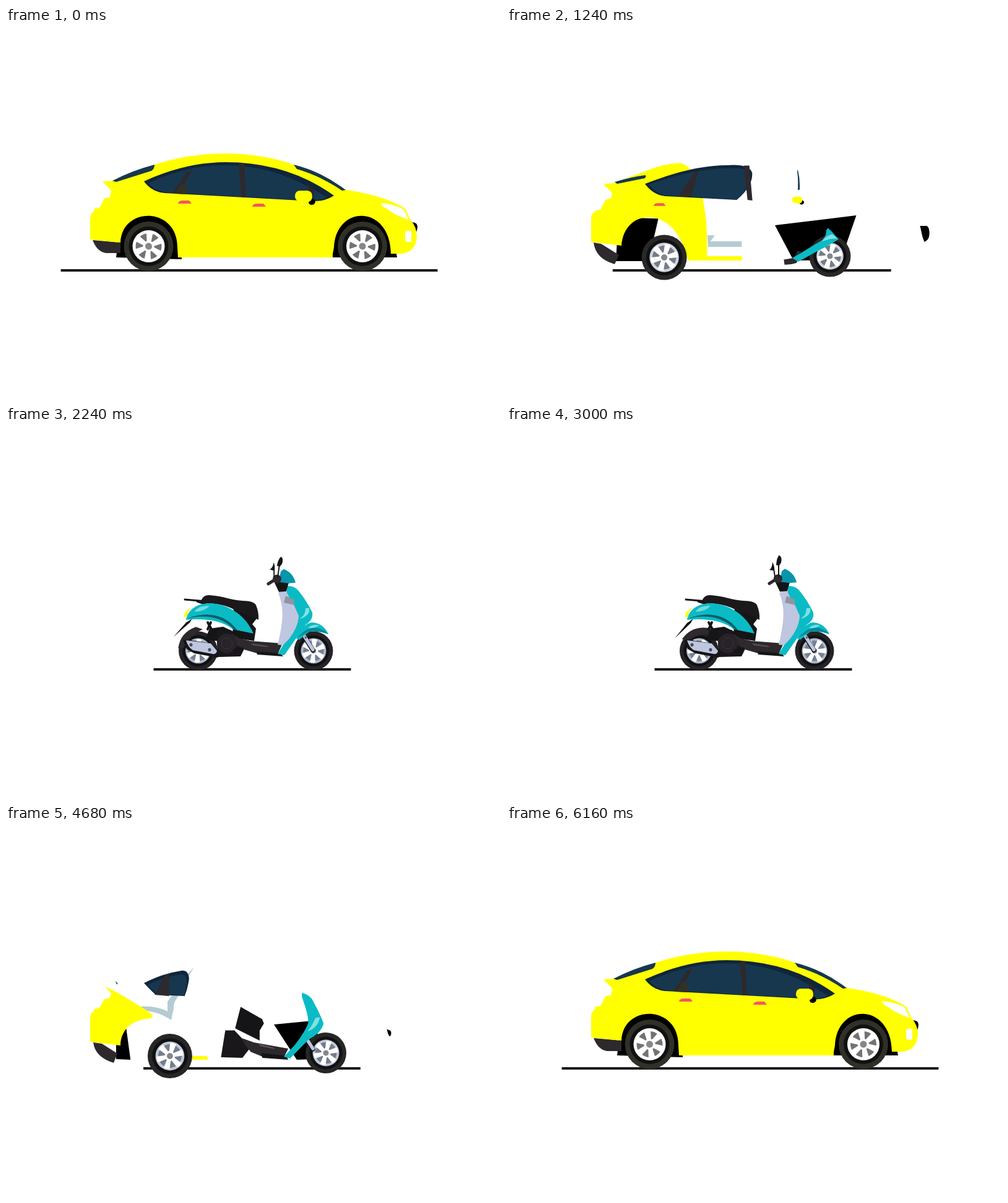
These frames come from a looping animation (800 px wide and 600 px high, 6200 ms). An HTML page:

```html
<!DOCTYPE html>
<html lang="en">
<head>
<meta charset="utf-8">
<title>Car and scooter</title>
<style>
html, body { margin: 0; width: 100%; height: 100%; overflow: hidden; background: #fff }
svg { display: block }
</style>
</head>
<body>
<svg id="stage" width="800" height="600" viewBox="0 0 800 600"></svg>
<script>
const LOOP = 6200, TURN = 6042;
const NUM = /-?\d+(\.\d+)?/g;
const stage = document.getElementById('stage');
const clamp = v => Math.max(0, Math.min(1, v));
const ease = u => u < .5 ? 4 * u ** 3 : 1 - 4 * (1 - u) ** 3;
const lerp = (a, b, u) => a + (b - a) * u;

function add(tag, attrs, parent) {
  const el = document.createElementNS('http://www.w3.org/2000/svg', tag);
  for (const k in attrs) el.setAttribute(k, attrs[k]);
  return parent.appendChild(el);
}

// Scale a path about x,y and shift it; by default it collapses to the point.
function move(d, x, y, s = 0, dx = 0, dy = 0) {
  let i = 0;
  return d.replace(NUM, n => i++ % 2 ? y + (n - y) * s + dy : x + (n - x) * s + dx);
}

function mixPath(a, b, u) {
  const to = b.match(NUM);
  let i = 0;
  return a.replace(NUM, n => lerp(+n, +to[i++], u).toFixed(2));
}

function at(keys, t, mix) {
  if (t <= keys[0][0]) return keys[0][1];
  for (let i = 1; i < keys.length; i++) {
    const [t0, a] = keys[i - 1], [t1, b] = keys[i];
    if (t < t1) return mix(a, b, (t - t0) / (t1 - t0));
  }
  return keys[keys.length - 1][1];
}

const parts = [], pops = [], wheels = [];
function part(parent, fill, ...keys) {
  parts.push([add('path', { fill }, parent), keys]);
}

// Group of fixed shapes that grows and swings out of a pivot between two times.
function pop(parent, x, y, from, to, spin, shapes, bob = 0) {
  const g = add('g', {}, parent);
  for (const [fill, d, width] of shapes)
    add('path', width ? { d, fill: 'none', stroke: fill, 'stroke-width': width, 'stroke-linecap': 'round' } : { d, fill }, g);
  pops.push({ g, x, y, from, to, spin, bob });
}

function wheel(parent, ...keys) {
  const g = add('g', {}, parent);
  const tyre = add('circle', { r: 40 }, g);
  add('circle', { r: 32, fill: '#111' }, g);
  const rim = add('circle', { r: 26 }, g);
  const hub = add('g', {}, g);
  const gaps = add('circle', { r: 21 }, hub);
  for (let a = 0; a < 360; a += 60)
    add('path', { d: 'M-3 -4 L-5.500 -23 Q0 -25 5.500 -23 L3 -4Z', fill: '#fff', transform: `rotate(${a})` }, hub);
  add('circle', { r: 9, fill: '#fff' }, hub);
  add('circle', { r: 5.5, fill: '#85878b' }, hub);
  wheels.push({ g, tyre, rim, hub, gaps, keys });
}

const ground = add('path', { stroke: '#191919', 'stroke-width': 4 }, stage);
const car = add('g', {}, stage);
const YELLOW = '#ff0', NAVY = '#17374f', DARK = '#2d292c', TEAL = '#0abbc5', BLACK = '#151517', SILVER = '#bfc6df';

// Inner frame, seen while the body opens
const bar = 'M324 335 L336 335 L329 345 L380 345 L380 354 L325 354Z';
part(car, '#b4cbd3', [1020, move(bar, 324, 354)], [1140, bar], [1240, bar], [1330, move(bar, 324, 354)]);
const frame = 'M292 241 L304 228 L294 245 L276 279 Q270 287 271 295 L267 314 Q242 297 215 299 L215 292 Q244 290 261 300 L261 284Z';
part(car, '#b4cbd3', [1250, move(frame, 250, 285)], [1330, frame], [1390, frame], [1480, move(frame, 240, 295)]);

// Underbody
const underRear = 'M178 330 L194 328 L201 378 L178 377Z';
part(car, '#000', [850, 'M186 298 L277 298 L284 374 L178 371Z'], [1240, 'M180 306 L245 308 L229 377 L176 377Z'],
  [1362, underRear], [1960, move(underRear, 190, 360)]);
const underFront = 'M433 321 L505 314 L500 377 L470 378Z';
part(car, '#000', [850, 'M530 300 L620 300 L632 371 L525 371Z'], [1240, 'M433 319 L565 303 L540 375 L463 376Z'],
  [1362, underFront], [1500, move(underFront, 472, 350)]);
const nose = 'M615 329 L619 330 Q622 331 622 335 Q622 340 619 340 L617 336Z';
part(car, '#000', [700, 'M656 314 L661 315 Q665 317 665 322 Q664 332 660 333 L657 330Z'],
  [802, 'M670 316 L683 315 Q688 318 688 325 Q688 342 679 343 L676 329Z'],
  [1240, 'M668 320 L679 320 Q684 323 683 335 Q682 343 675 346 L672 338Z'],
  [1362, nose], [1420, move(nose, 605, 335)]);
const bumper = 'M141 350 L155 352 L180 368 L174 383 Q144 374 141 350Z';
part(car, DARK, [850, 'M140 343 L185 347 L185 364 L162 364 Q147 362 140 343Z'],
  [1240, 'M140 347 L152 349 L181 367 L174 382 Q143 373 140 347Z'], [1362, bumper], [1940, move(bumper, 180, 368)]);

// Body shell
const shell = 'M160 260 L170 264 L190 276 C198 281 205 285 211 289 C218 293 226 298 230 301 C234 304 236 306 236 308 C236 310 234 310 233 311 L232 311 Q231 311 230 311 Q229 311 228 311 L227 311 C226 311 222 312 221 312 L219 313 L217 313 L215 314 C197 320 185 335 185 355 L136 349 L136 309 Q137 302 141 300 L143 296 L151 294 Q156 285 159 280 L168 278 L170 270Z';
part(car, YELLOW,
  [820, 'M156 248 L172 247 L240 221 C280 208 320 203 353 203 C395 203 435 210 465 221 C500 233 525 248 550 262 C585 267 620 276 645 292 L654 311 Q664 321 664 338 Q662 362 640 365 L622 365 C621 285 533 285 530 355 L527 371 L278 371 L277 355 C277 288 187 288 185 347 L136 342 L136 307 Q137 299 141 298 L143 292 L151 291 Q156 282 159 275 L168 274 L170 263Z'],
  [1240, 'M156 252 L172 251 L240 225 C250 222 270 217 280 218 C288 219 294 225 298 230 C304 240 312 260 317 275 C321 295 324 320 324 345 L324 369 Q324 370 324 372 Q324 376 322 376 L320 376 C318 376 312 376 310 376 L300 376 L294 376 L290 368 C272 288 190 288 185 352 L136 346 L136 307 Q137 299 141 298 L143 295 L151 294 Q156 285 159 278 L168 275 L170 267Z'],
  [1362, shell], [1900, move(shell, 150, 345)]);
const sill = 'M300 372 L324 372 L327 378 L301 378Z';
part(car, YELLOW, [850, 'M278 365 L528 365 L528 371 L278 371Z'], [1240, 'M292 369 L380 369 L380 376 L292 376Z'],
  [1362, sill], [1430, move(sill, 300, 375)]);

// Lamps
const lamp = 'M606 283 Q632 286 643 294 L651 310 Q630 304 615 292 Q606 288 606 283Z';
part(car, '#fff', [680, lamp], [805, move(lamp, 604, 279, .08)], [830, move(lamp, 604, 279)]);
const fog = 'M647 328 L655 328 L655 346 L649 346 Q645 346 645 340 L645 331Z';
part(car, '#fff', [680, fog], [780, move(fog, 655, 337)]);

// Windows: dark rim, glass, pillars
const glass = 'M223 254 Q255 238 283 234 Q294 233 295 247 Q293 263 288 275 L242 273 Q234 266 223 254Z';
part(car, '#10253c', [820, 'M223 248 Q290 217 355 217 Q455 217 530 271 Q515 281 495 280 L258 267 Q236 266 223 248Z'],
  [1240, 'M223 252 Q300 222 355 222 Q392 219 397 234 Q399 255 372 278 L256 272 Q236 270 223 252Z'],
  [1362, glass], [1480, move(glass, 225, 258)]);
part(car, NAVY, [820, 'M230 251 Q290 222 355 222 Q440 222 518 274 Q510 279 495 279 L260 266 Q240 263 230 251Z'],
  [1240, 'M230 253 Q300 228 355 227 Q388 224 394 237 Q395 255 372 277 L258 271 Q240 268 230 253Z'],
  [1362, 'M229 257 Q258 243 282 240 Q290 239 291 249 Q291 263 287 274 L245 272 Q236 266 229 257Z'],
  [1480, move(glass, 225, 258)]);
const pillar = 'M257 241 L263 239 L263 275 L240 273Z';
part(car, DARK, [680, 'M291 234 L301 229 L280 267 L269 267Z'], [802, 'M311 231 L320 227 L304 269 L288 268Z'],
  [1240, 'M303 233 L310 231 L298 273 L278 271Z'], [1362, pillar], [1470, move(pillar, 240, 270)]);
const pillarFoot = 'M308 249 L304 269 L295 269 L297 257Z';
part(car, '#303128', [680, 'M284 252 L292 255 L293 269 L272 268Z'], [802, pillarFoot], [1000, move(pillarFoot, 296, 269)]);
const post = 'M383 222 L392 222 L397 279 L389 278Z';
part(car, DARK, [680, 'M376 219 L385 219 L388 274 L381 274Z'], [802, 'M393 219 L401 219 L405 275 L398 274Z'],
  [1240, post], [1340, move(post, 360, 270)]);
const front = 'M486 249 L498 262 L496 280 L489 263Z';
part(car, '#29262a', [680, front], [802, move(front, 490, 265, 1, 14, -1)], [1000, move(front, 500, 270)]);

// Windscreens
const rearScreen = 'M177 251 Q178 252 179 253 Q180 255 180 256 L179 256Z';
part(car, NAVY, [680, 'M172 247 Q205 230 240 221 Q240 228 235 231 L178 249Z'],
  [802, 'M173 247 Q200 221 224 201 Q228 202 228 206 L180 248Z'],
  [1240, 'M174 249 Q200 241 224 238 Q226 240 223 243 L178 252Z'],
  [1362, rearScreen], [1390, move(rearScreen, 178, 252)]);
const screen = 'M470 229 Q474 245 473 262 L470 262 Q471 245 469 231Z';
part(car, NAVY, [680, 'M465 221 Q510 232 549 262 L543 263 Q510 240 470 228Z'],
  [802, 'M464 224 Q510 222 556 228 L553 233 Q510 227 469 229Z'], [1240, screen], [1330, move(screen, 471, 250)]);

// Mirror and door handles
const dot = 'M489 281 Q489 276 494 276 Q499 276 500 281 Q499 286 494 286 Q489 286 489 281Z';
part(car, '#000', [680, dot], [802, move(dot, 494, 281, 1.2, 17, 0)], [1240, move(dot, 494, 281, .7, -18, 1)], [1320, move(dot, 476, 280)]);
const mirror = 'M467 272 Q467 263 476 263 L487 263 Q495 264 495 272 Q495 281 486 282 L475 280 Q467 279 467 272Z';
part(car, YELLOW, [680, mirror], [802, move(mirror, 481, 272, 1, 17, 0)], [1240, move(mirror, 481, 272, .6, -12, 6)], [1320, move(mirror, 469, 278)]);
const handle = 'M278 284 Q279 279 286 279 L296 279 L300 284Z';
const handle2 = move(handle, 0, 0, 1, 120, 5);
part(car, '#f25566', [680, handle], [802, move(handle, 0, 0, 1, 19, 0)], [1240, move(handle, 289, 282, .9, -42, 4)], [1330, move(handle, 220, 288)]);
part(car, '#f25566', [680, handle2], [802, move(handle2, 0, 0, 1, 19, 0)], [1180, move(handle2, 340, 288)]);

wheel(stage, [820, [230.5, 353, 40]], [1240, [254, 371, 36.5]], [1362, [265, 372, 36]], [1960, [299, 368, 34]], [2180, [310.5, 362, 31.5]]);
wheel(stage, [820, [576, 353, 40]], [1240, [522, 369, 33.5]], [1362, [517, 367, 33]], [1980, [497, 362, 31.5]]);

// Scooter, rear to front
const scooter = add('g', {}, stage);
pop(scooter, 310, 362, 1850, 2330, -150, [[DARK, 'M283 343 Q298 321 326 325 L334 334 Q309 333 291 347Z']]);
pop(scooter, 301, 310, 1850, 2330, 15, [[BLACK, 'M271 342 L291 317 L301 310 L297 317Z']]);
pop(scooter, 350, 335, 1640, 2080, -20, [[BLACK, 'M326 316 L332 327 M331 316 L326 327', 4], [BLACK, 'M321 345 L329 326 L351 323 L372 333 L369 347Z']]);

const tank = 'M368 288 L408 306 L398 319 L404 326 L401 346 L366 341Z';
part(scooter, BLACK, [1260, move(tank, 400, 340)], [1362, 'M379 292 L414 312 L417 319 L410 331 L410 347 L370 327Z'], [1950, tank]);
const engine = 'M340 330 L363 328 L376 346 L385 359 L379 371 L342 372Z';
part(scooter, '#19171a', [1270, move(engine, 390, 365)], [1362, 'M354 330 L369 330 L382 344 L393 361 L382 375 L347 374Z'], [1950, engine]);
const floor = 'M448 375 L465 372 L470 360 L476 362 L470 375 L468 380 L460 382 L452 383 L449 383Z';
part(scooter, DARK, [1180, move(floor, 468, 378)], [1240, floor],
  [1362, 'M372 321 L381 343 L400 350 L456 360 L450 372 L455 377 L414 373 L395 365 L385 352Z'],
  [1950, 'M364 334 L378 342 L395 346 L447 350 L440 365 L447 369 L406 366 L385 360 L372 352Z']);
const floorEdge = 'M405 363 L444 366 L448 371 L406 368Z';
part(scooter, BLACK, [1270, move(floorEdge, 448, 376)], [1362, 'M412 367 L454 372 L456 378 L414 375Z'], [1950, floorEdge]);
const step = 'M396 350 L422 354 L424 356 L399 353Z';
part(scooter, '#59525e', [1270, move(step, 450, 372)], [1362, 'M407 352 L432 358 L435 361 L411 356Z'], [1950, step]);

pop(scooter, 357, 350, 1650, 2080, 0, [
  ['#282229', 'M341 350 A16 16 0 0 1 373 350 A16 16 0 0 1 341 350Z'],
  ['#3b343c', 'M348 350 A9 9 0 0 1 366 350 A9 9 0 0 1 348 350Z', 1],
  [BLACK, 'M368 361 L382 358 M370 365 L380 365', 3]]);
pop(scooter, 340, 365, 1700, 2180, -30, [
  [BLACK, 'M286 345 L292 359 L304 366 L342 373 L345 363 L332 350 L293 344Z'],
  [SILVER, 'M291 345 L331 350 L341 362 Q340 368 334 367 L302 361 Q294 356 291 345Z'],
  ['#4b4c58', 'M299 352 L299 352.500 M329 360 L329 360.500', 5]]);
pop(scooter, 395, 330, 1580, 2120, 25, [
  [BLACK, 'M289 279 L324 282', 3], [BLACK, 'M309 282 L326 288', 3],
  ['#1c191c', 'M315 281 Q319 271 329 272 C351 273 362 280 382 281 Q400 281 404 288 Q409 300 408 312 C394 303 377 300 362 292 Q343 284 315 285Z'],
  [TEAL, 'M291 311 C295 294 310 285 330 285 C362 287 388 306 400 334 L366 327 C350 313 320 309 291 312Z'],
  ['#075f6c', 'M293 310 C322 297 356 303 373 328 L369 328 C351 308 322 302 293 310Z'],
  ['#73dbe0', 'M305 299 Q309 289 329 289 Q322 298 305 299Z'],
  [YELLOW, 'M287 307 Q290 296 299 292 Q292 300 293 307Z']]);

pop(scooter, 497, 362, 1270, 1380, 0, [[BLACK, 'M481 337 L496 361', 7.5], [SILVER, 'M482 338 L496 360', 5.5], ['#54586a', 'M484 340 L484.500 341', 3]]);
pop(scooter, 480, 335, 1500, 1960, -20, [
  [TEAL, 'M469 342 Q479 319 494 316 Q513 317 521 335 Q506 329 490 331 L474 344Z'],
  ['#078b9a', 'M471 341 Q485 323 504 325 Q515 328 521 335 Q503 329 489 331Z'],
  ['#7bdfe2', 'M488 325 Q496 318 506 321 Q499 326 488 325Z']]);

const shield = 'M519 324 Q526 330 530 335 Q533 339 536 342 Q530 346 522 350 Q510 357 500 362 L471 378 L461 372 L475 364 Q495 352 510 343 Q517 335 516 328Z';
const inner = 'M440 268 L452 263 Q457 276 464 285 L473 305 C473 323 459 344 447 353 L439 352 Q449 313 446 291 Q444 278 440 268Z';
part(scooter, TEAL, [1180, move(shield, 461, 372)], [1240, shield],
  [1362, 'M478 269 Q488 272 494 279 Q506 300 513 319 Q512 326 503 336 Q497 341 488 346 L459 376 L449 373 L466 355 Q483 333 488 319 Q490 310 478 276Z'],
  [1950, 'M455 257 Q466 257 472 264 Q486 281 495 300 Q497 312 484 320 Q478 328 470 340 L450 369 L439 367 L452 346 Q474 318 471 304 Q460 285 453 268Z']);
part(scooter, SILVER, [1450, move(inner, 465, 330)], [1950, inner]);
const patch = 'M452 273 L465 279 L466 288 L449 284Z';
part(scooter, '#9094a4', [1550, move(patch, 460, 285)], [1950, patch]);
const shine = 'M510 344 Q518 335 526 334 L535 341 Q524 340 510 345Z';
part(scooter, '#83dfe2', [1190, move(shine, 465, 372)], [1240, shine],
  [1362, 'M488 331 Q495 322 500 310 L507 309 Q505 325 488 332Z'],
  [1950, 'M476 309 Q484 304 484 293 L490 293 Q492 305 476 310Z']);

// Steering
pop(scooter, 447, 262, 1920, 2200, 25, [
  [BLACK, 'M433 249 L457 251 L453 265 L441 266Z'],
  ['#0795ab', 'M441 250 L444 233 L449 229 Q464 235 468 251 L457 252Z'],
  [DARK, 'M424 253 L435 246', 5],
  [DARK, 'M431 245 A7 7 0 0 1 445 245 A7 7 0 0 1 431 245Z']], .4);
pop(scooter, 437, 243, 1950, 2310, 42, [
  [BLACK, 'M439 242 L439 222 M433 242 L431 229', 2],
  [BLACK, 'M435 223 Q436 210 440 207 Q445 210 443 219 L440 224Z'],
  [BLACK, 'M424 231 Q429 227 429 218 Q433 226 432 232Z']], .4);

const mixList = (a, b, u) => a.map((v, i) => lerp(v, b[i], u));
const rgb = (a, b, u) => `rgb(${mixList(a, b, u)})`;

function draw(now) {
  const t = now % LOOP;
  const T = Math.min(t, TURN - t); // the way back mirrors the way out
  const bounce = 1 - Math.cos(t / LOOP * 20 * Math.PI);
  const p = ease(clamp((T - 900) / 660));
  ground.setAttribute('d', `M${lerp(88.5, 238.5, p)} 392H${lerp(697.5, 557.5, p)}`);
  car.setAttribute('transform', `translate(0 ${bounce * clamp((1100 - T) / 200)})`);
  for (const [el, keys] of parts) el.setAttribute('d', at(keys, T, mixPath));
  for (const { g, x, y, from, to, spin, bob } of pops) {
    const u = clamp((T - from) / (to - from)), s = 1 - (1 - u) ** 2;
    g.setAttribute('visibility', u ? 'visible' : 'hidden');
    g.setAttribute('transform', `translate(${x} ${y + bob * bounce}) rotate(${spin * (1 - u)}) scale(${s}) translate(${-x} ${-y})`);
  }
  const k = clamp((T - 820) / 700);
  for (const { g, tyre, rim, hub, gaps, keys } of wheels) {
    const [x, y, r] = at(keys, T, mixList);
    g.setAttribute('transform', `translate(${x} ${y}) scale(${r / 40})`);
    hub.setAttribute('transform', `rotate(${t / LOOP * 2160 + 4})`);
    tyre.setAttribute('fill', rgb([48, 48, 41], [37, 35, 39], k));
    rim.setAttribute('fill', rgb([255, 255, 255], [173, 184, 203], k));
    gaps.setAttribute('fill', rgb([115, 115, 115], [118, 128, 148], k));
  }
}

const start = performance.now();
function tick() {
  draw(performance.now() - start);
  requestAnimationFrame(tick);
}
tick();
</script>
</body>
</html>
```
